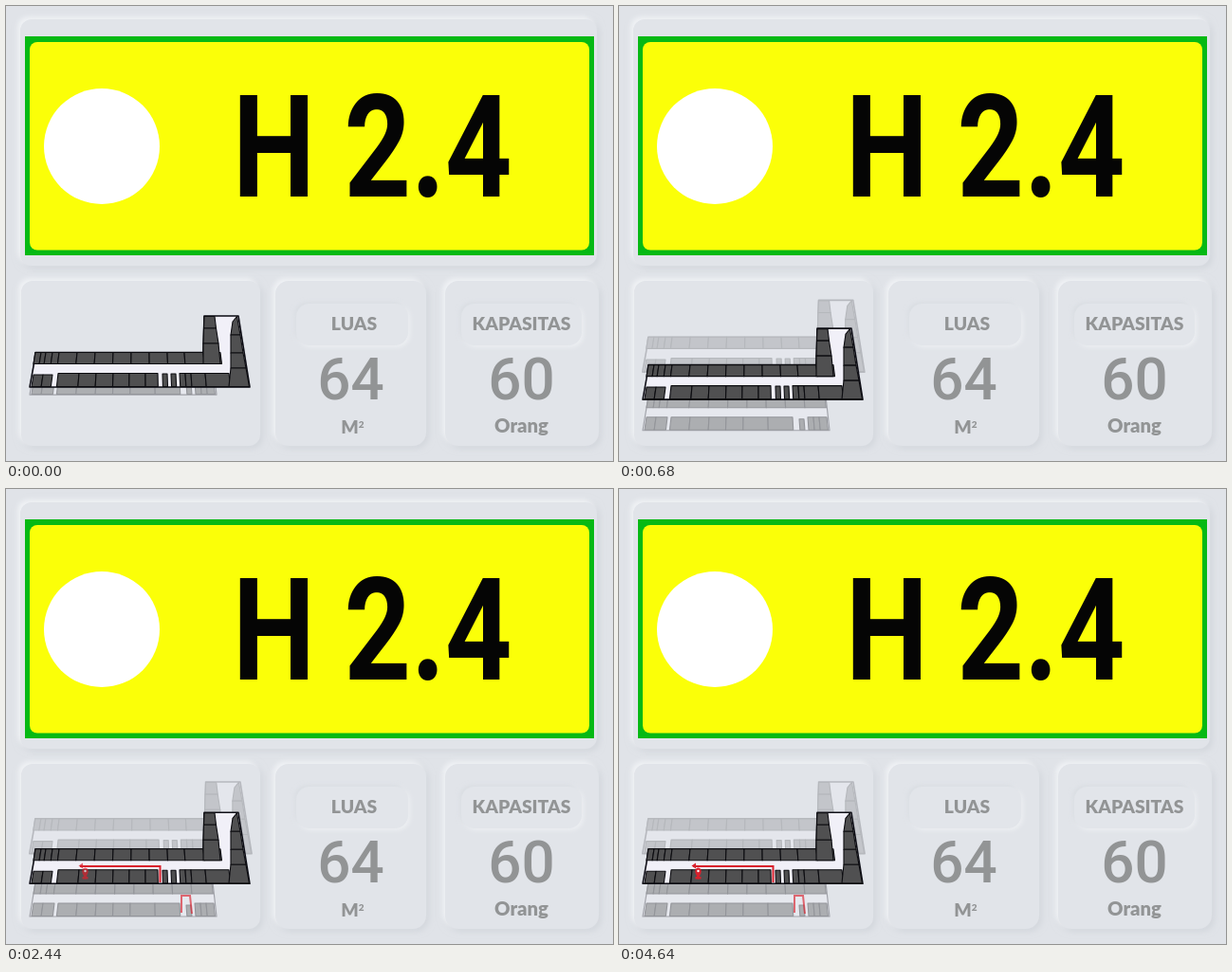
An HTML page for the animation above (5.12 s loop, 640x480 px).

```html
<!DOCTYPE html>
<html lang="id">
<head>
<meta charset="utf-8">
<title>H 2.4</title>
<style>
html, body { margin: 0; width: 100%; height: 100%; overflow: hidden; background: #e0e3e8; }
svg { display: block; width: 640px; height: 480px; }
.card { fill: #e1e4e9; filter: url(#raise); }
.pill { fill: #e2e5ea; filter: url(#soft); }
.label { font: 900 19.3px Lato, sans-serif; fill: #929495; text-anchor: middle; }
.num { font: 500 62px Roboto, sans-serif; fill: #929495; text-anchor: middle; }
.room { font: 700 150px Roboto, sans-serif; fill: #050505; }
.route { fill: none; stroke: #d9202c; stroke-width: 2; }
</style>
</head>
<body>
<svg viewBox="0 0 640 480">
  <defs>
    <filter id="raise" x="-10%" y="-10%" width="120%" height="120%">
      <feDropShadow dx="-3" dy="-3" stdDeviation="2.5" flood-color="#f3f5f8" flood-opacity=".85"/>
      <feDropShadow dx="3" dy="3" stdDeviation="3" flood-color="#c8ccd3" flood-opacity=".55"/>
    </filter>
    <filter id="soft" x="-10%" y="-20%" width="120%" height="140%">
      <feDropShadow dx="-2" dy="-2" stdDeviation="2" flood-color="#d2d6dc" flood-opacity=".6"/>
      <feDropShadow dx="2" dy="2" stdDeviation="2" flood-color="#f2f4f7" flood-opacity=".7"/>
    </filter>
    <g id="main"></g>
    <g id="base"></g>
  </defs>

  <rect width="640" height="480" fill="#e0e3e8"/>
  <rect class="card" x="15" y="14" width="608" height="260" rx="12"/>
  <rect class="card" x="16" y="290" width="252" height="174" rx="12"/>
  <rect class="card" x="284" y="290" width="159" height="174" rx="14"/>
  <rect class="card" x="463" y="290" width="162" height="174" rx="14"/>
  <rect class="pill" x="306" y="314" width="118" height="44" rx="14"/>
  <rect class="pill" x="480" y="314" width="127" height="44" rx="14"/>

  <rect x="20" y="32" width="600" height="231" fill="#06b914"/>
  <rect x="25" y="38" width="590" height="219.5" rx="8" fill="#fbff08"/>
  <circle cx="101" cy="148" r="61" fill="#fff"/>
  <text class="room" transform="translate(239 201) scale(.82 1)">H 2.4</text>

  <text class="label" x="367" y="342">LUAS</text>
  <text class="label" x="543.5" y="342">KAPASITAS</text>
  <text class="num" x="363.5" y="415">64</text>
  <text class="num" x="543.5" y="415">60</text>
  <text class="label" x="365.5" y="451">M<tspan font-size="10" dy="-6">2</tspan></text>
  <text class="label" x="543.5" y="449.5" style="font-size:20.3px">Orang</text>

  <use id="low" href="#base" opacity=".36"/>
  <use id="high" href="#main" opacity=".2"/>
  <use id="mid" href="#main"/>
  <path class="route" id="routeA" d="M196 448L194 429H185V447" opacity=".65" stroke-width="1.6"/>
  <path class="route" id="routeB" d="M162.5 415V398H78"/>
  <g id="pin" fill="#d9202c">
    <path d="M76.500 397.500L81 394.500V400.500Z"/>
    <path d="M83.500 412L80.500 405Q79.500 400 83.500 399.500Q87.500 400 86.500 405Z"/>
    <circle cx="83.500" cy="403" r="1.200" fill="#fff"/>
    <path d="M80.500 409H86.500V411.500H80.500Z"/>
  </g>
</svg>
<script>
const $ = id => document.getElementById(id);
const clamp = v => Math.max(0, Math.min(1, v));
const span = (t, a, b) => clamp((t - a) / (b - a));

const shape = (d, fill, line, w) =>
  `<path d="${d}" fill="${fill}" stroke="${line}" stroke-width="${w}" stroke-linejoin="round"/>`;
const cell = d => shape(d, '#505051', '#0c0c10', 1.1);

// A row of rooms between two heights, slanting with the left wall.
function row(xs, top, bottom) {
  let s = '';
  for (let i = 0; i + 1 < xs.length; i++) {
    const [a, b] = [xs[i], xs[i + 1]];
    const lean = x => (x - 142) * 0.018;
    s += cell(`M${a} ${top}H${b}L${b + lean(b)} ${bottom}H${a + lean(a)}Z`);
  }
  return s;
}

const north = [31, 37, 42, 49, 56, 75, 94, 113, 132, 151, 170, 188, 208, 226];
const south = [55, 77, 95, 113, 130, 147, 160];

// Plans are drawn in their stacked position.
$('main').innerHTML =
  shape('M31 365.500H208L209 327H245L257 402H25L29 380Z', '#f1f0f8', '#101018', 1.6) +
  row(north, 365.5, 377.5) +
  row([29, 39, 49], 389, 401.5) +
  row(south, 387.5, 401.5) +
  row([165, 170], 388, 401.5) + row([174, 179], 388, 401.5) +
  row([183, 189, 195, 210, 235], 387.5, 401.5) +
  cell('M209 327.500H220L221.500 340H208.500Z') +
  cell('M208.500 340H221.500L224 356H208Z') +
  cell('M208 356H224L226 377.500H208Z') +
  cell('M239 333L243.500 327.500L247 347H237Z') +
  cell('M237 347H247L250 366H237Z') +
  cell('M237 366H250L253 382H237Z') +
  cell('M237 382H253L256.500 401.500H235Z');

$('base').innerHTML =
  shape('M31 374H218L222 410H25Z', '#f1f0f8', '#30303a', 1.2) +
  row([31, 38, 44, 52, 75, 95, 115, 135, 155, 175, 195, 217], 374, 386) +
  row([29, 39, 51], 396, 409.5) +
  row([55, 75, 95, 113, 131, 157, 183], 396, 409.5) +
  row([190, 195], 398, 409.5) + row([199, 205, 211, 219], 396, 409.5);

const move = (id, y) => $(id).setAttribute('transform', `translate(0 ${y.toFixed(2)})`);

const lengths = {};
function trace(id, p) {
  const el = $(id), len = lengths[id] ??= el.getTotalLength();
  el.style.visibility = p > 0 ? 'visible' : 'hidden';
  el.style.strokeDasharray = `${len * p} ${len + 10}`;
}

function draw(t) {
  const p = span(t, 0, 740);
  move('mid', 14.3 * p);
  move('low', 41 * p);
  $('high').setAttribute('transform',
    `translate(${-0.5 * p} ${-18 * p - 3.3 * p}) scale(${1 + 0.01 * p})`);
  trace('routeA', span(t, 1600, 1770));
  trace('routeB', span(t, 1770, 2160));
  const k = span(t, 2160, 2560);
  $('pin').setAttribute('opacity', k);
}

const start = performance.now();
function tick() {
  draw((performance.now() - start) % 5120);
  requestAnimationFrame(tick);
}
draw(0);
tick();
</script>
</body>
</html>
```
